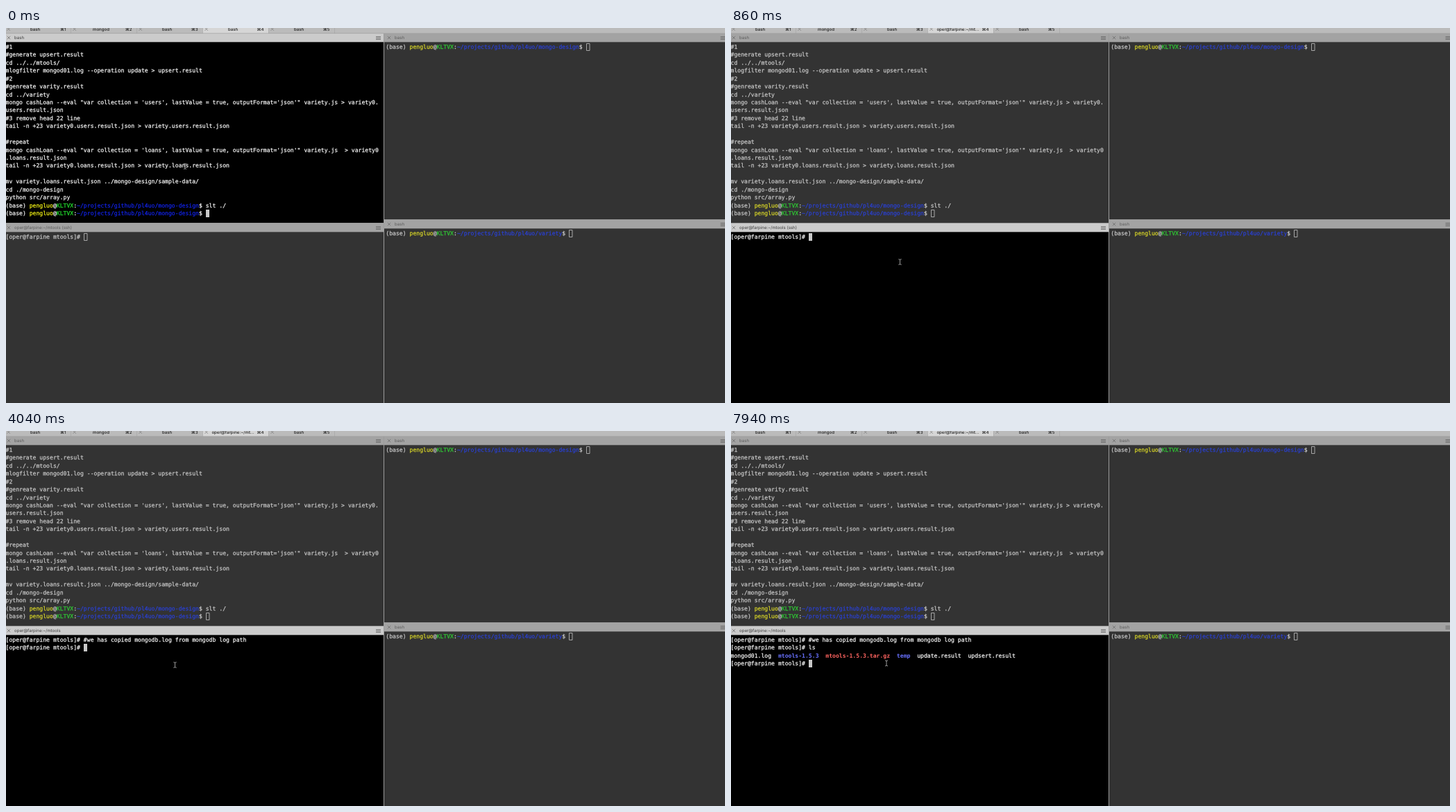
An HTML page with a canvas that plays this animation: 1036 by 541 pixels, repeating every 8000 ms.

```html
<!DOCTYPE html>
<html lang="en">
<head>
<meta charset="utf-8">
<title>Split terminal</title>
<style>
html, body { margin: 0; width: 100%; height: 100%; overflow: hidden; background: #333; }
canvas { display: block; }
</style>
</head>
<body>
<canvas id="stage" width="1036" height="541"></canvas>
<script>
const ctx = document.getElementById('stage').getContext('2d');
const LOOP = 8000, CELL = 4.885, LINE = 11.43, BAR = 12.3;
const MONO = '8.114px "DejaVu Sans Mono", monospace';
const UI = 'Inter, "DejaVu Sans", sans-serif';
const DIVIDER = '#9c9c9c';

const ACTIVE = { bg: '#000', bar: '#cbcbcb', title: '#3c3c3c', fg: '#f4f4f4',
  yellow: '#f0f014', green: '#22e02e', blue: '#1122e2', dir: '#6871ff', archive: '#ff6460' };
const IDLE = { bg: '#333', bar: '#a3a3a3', title: '#5c5c5c', fg: '#c6c6c6',
  yellow: '#d6d428', green: '#2fca34', blue: '#2a40d2' };

const host = 'oper@farpine';
const remotePrompt = '[' + host + ' mtools]# ';

const notes = `#1
#generate upsert.result
cd ../../mtools/
mlogfilter mongod01.log --operation update > upsert.result
#2
#genreate varity.result
cd ../variety
mongo cashLoan --eval "var collection = 'users', lastValue = true, outputFormat='json'" variety.js > variety0.
users.result.json
#3 remove head 22 line
tail -n +23 variety0.users.result.json > variety.users.result.json

#repeat
mongo cashLoan --eval "var collection = 'loans', lastValue = true, outputFormat='json'" variety.js  > variety0
.loans.result.json
tail -n +23 variety0.loans.result.json > variety.loans.result.json

mv variety.loans.result.json ../mongo-design/sample-data/
cd ./mongo-design
python src/array.py`.split('\n').map(text => [[text]]);

const prompt = (folder, command = '') => [
  ['(base) '], ['pengluo', 'yellow'], ['@'], ['KLTVX', 'green'], [':'],
  ['~/projects/github/pl4uo/' + folder, 'blue'], ['$ ' + command]
];

const listing = [
  ['mongod01.log  '], ['mtools-1.5.3', 'dir', true], ['  '],
  ['mtools-1.5.3.tar.gz', 'archive', true], ['  '], ['temp', 'dir', true],
  ['  update.result  updsert.result']
];

// Pointer stops: start time, x, y
const pointerStops = [
  [0, 258, 199.5], [140, 266, 202.5], [410, 270.5, 292], [560, 243.5, 337.5], [7940, 224, 335]
];

function remoteRows(t) {
  const rows = [[[remotePrompt + (t >= 1610 ? '#we has copied mongodb.log from mongodb log path' : '')]]];
  if (t >= 3890) {
    const typed = t >= 5690 ? 'ls' : t >= 5390 ? 'l' : '';
    rows.push([[t >= 4040 ? remotePrompt + typed : '']]);
  }
  if (t >= 6140) rows.push(listing, [[t >= 6290 ? remotePrompt : '']]);
  return rows;
}

function rect(color, x, y, w, h) {
  ctx.fillStyle = color;
  ctx.fillRect(x, y, w, h);
}

function label(text, x, y, color, size = 6.1, weight = 400, align = 'left') {
  ctx.font = `${weight} ${size}px ${UI}`;
  ctx.textAlign = align;
  ctx.fillStyle = color;
  ctx.fillText(text, x, y);
}

function cross(x, y, color) {
  ctx.strokeStyle = color;
  ctx.lineWidth = 0.7;
  ctx.beginPath();
  ctx.moveTo(x - 2.2, y - 2.2);
  ctx.lineTo(x + 2.2, y + 2.2);
  ctx.moveTo(x + 2.2, y - 2.2);
  ctx.lineTo(x - 2.2, y + 2.2);
  ctx.stroke();
}

// Writes coloured runs on the character grid and returns the end column.
// A hairline stroke gives the glyphs the weight of smoothed screen text.
function writeRow(row, x, baseline, theme) {
  let col = 0;
  ctx.textAlign = 'left';
  ctx.lineWidth = 0.25;
  for (const [text, color = 'fg', bold] of row) {
    ctx.font = (bold ? 'bold ' : '') + MONO;
    ctx.fillStyle = ctx.strokeStyle = theme[color];
    for (const ch of text) {
      const cx = x + col++ * CELL;
      if (ch === ' ') continue;
      ctx.fillText(ch, cx, baseline);
      if (!bold) ctx.strokeText(ch, cx, baseline);
    }
  }
  return col;
}

function pane({ x, y, w, h, textX, title, rows, active }) {
  const theme = active ? ACTIVE : IDLE;
  rect(theme.bg, x, y, w, h);
  rect(theme.bar, x, y, w, BAR);
  rect(DIVIDER, x, y - 1, w, 1);
  cross(x ? 552 : 4, y + 6, '#666');
  label(title, x ? 560 : 12, y + 8.3, theme.title);
  for (let i = 0; i < 3; i++) rect('#666', x ? 1029.5 : 533, y + 4 + i * 2, 7, 0.9);

  let col = 0;
  rows.forEach((row, i) => { col = writeRow(row, textX, y + 22 + i * LINE, theme); });
  const cx = Math.max(0, Math.round(textX + col * CELL));
  const cy = Math.round(y + 13.6 + (rows.length - 1) * LINE);
  if (active) {
    rect('#c9c9c9', cx, cy, 5, 11);
  } else {
    ctx.strokeStyle = '#b4b4b4';
    ctx.lineWidth = 0.9;
    ctx.strokeRect(cx + 0.5, cy + 0.5, 4.5, 10);
  }
}

function tabs(remoteActive) {
  rect('#bbb', 0, 0, 1036, 8);
  rect('#d6d6d6', 283, 0, 95, 8);
  const names = ['bash', 'mongod', 'bash', remoteActive ? host + ':~/mt...' : 'bash', 'bash'];
  names.forEach((name, i) => {
    const x = i * 95;
    cross(x + 3.7, 1.6, '#777');
    label(name, x + 42, 4.1, '#222', 6.1, 500, 'center');
    label('⌘' + (i + 1), x + 86.5, 4.1, '#222', 6.1, 500, 'right');
    rect('#a8a8a8', x + 93, 0, 0.7, 8);
  });
  rect('#999', 0, 7.5, 1036, 0.6);
}

function pointer(x, y) {
  ctx.strokeStyle = '#bebebe';
  ctx.lineWidth = 0.8;
  ctx.beginPath();
  for (const s of [-1, 1]) {
    ctx.moveTo(x - 2, y + s * 4);
    ctx.quadraticCurveTo(x, y + s * 4, x, y + s * 2.8);
    ctx.quadraticCurveTo(x, y + s * 4, x + 2, y + s * 4);
  }
  ctx.moveTo(x, y - 3.2);
  ctx.lineTo(x, y + 3.2);
  ctx.stroke();
}

function draw(t) {
  const remoteActive = t >= 860;
  ctx.textRendering = 'geometricPrecision';
  ctx.textBaseline = 'alphabetic';
  ctx.lineJoin = 'round';
  rect('#333', 0, 0, 1036, 541);

  pane({ x: 0, y: 8, w: 544, h: 274, textX: -0.5, title: 'bash', active: !remoteActive,
    rows: [...notes, prompt('mongo-design', 'slt ./'), prompt('mongo-design')] });
  pane({ x: 0, y: 282, w: 544, h: 259, textX: -0.5, active: remoteActive,
    title: host + ':~/mtools' + (t < 4040 ? ' (ssh)' : ''), rows: remoteRows(t) });
  pane({ x: 545, y: 8, w: 491, h: 269, textX: 547.3, title: 'bash', rows: [prompt('mongo-design')] });
  pane({ x: 545, y: 277, w: 491, h: 264, textX: 547.3, title: 'bash', rows: [prompt('variety')] });
  rect(DIVIDER, 544, 8, 1, 533);
  tabs(remoteActive);

  const [, px, py] = pointerStops.filter(([start]) => t >= start).pop();
  pointer(px, py);
}

const origin = performance.now();
function tick() {
  draw((performance.now() - origin) % LOOP);
  requestAnimationFrame(tick);
}
tick();
</script>
</body>
</html>
```
